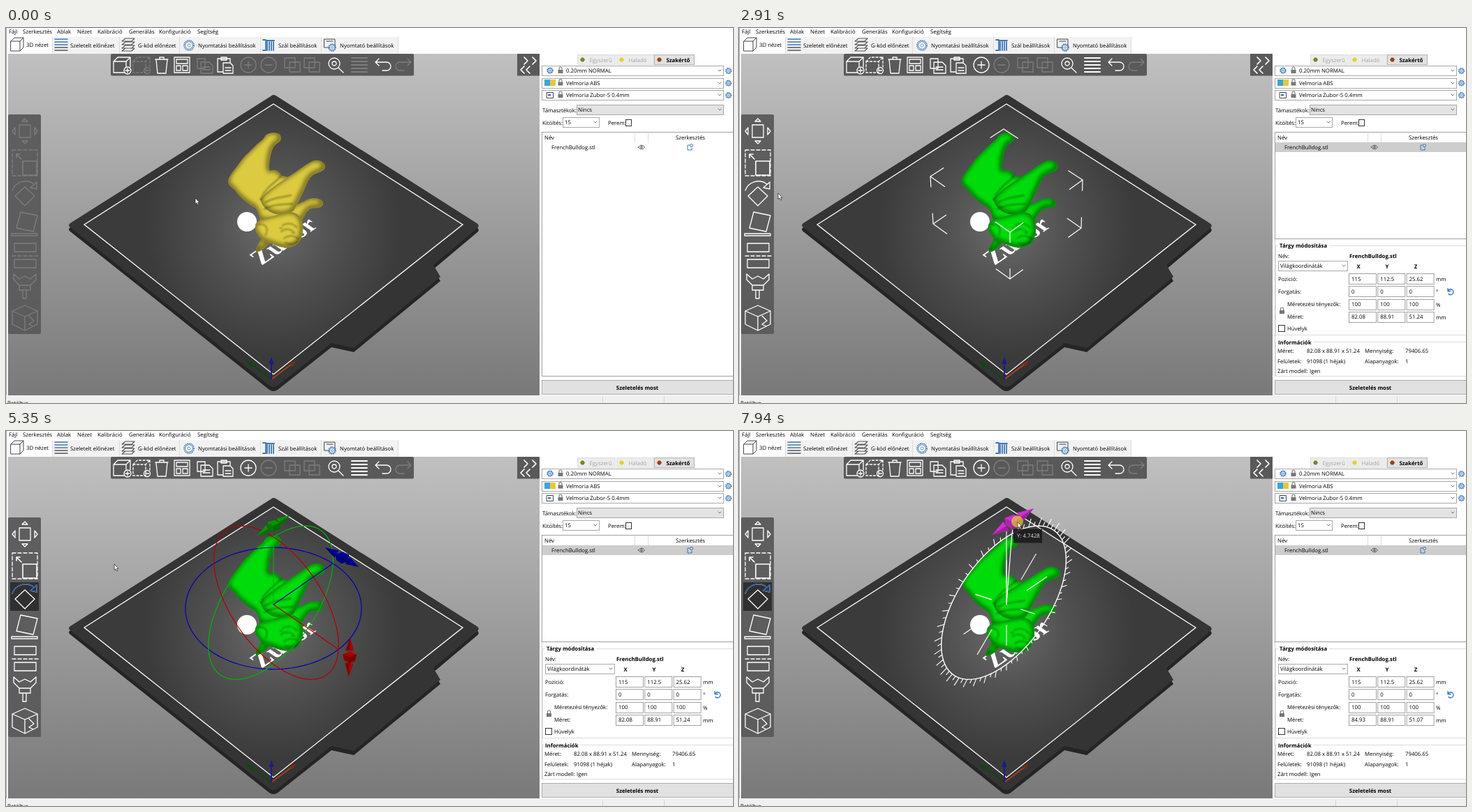
Write an HTML page that moves like this. It is 1041 px wide and 538 px high and loops after 8 s.

```html
<!DOCTYPE html>
<html lang="hu">
<head>
<meta charset="utf-8">
<style>
html, body { margin: 0; height: 100%; overflow: hidden; background: #fff; }
svg { display: block; width: 100vw; height: 100vh; font: 7.8px "Open Sans", sans-serif; text-rendering: geometricPrecision; }
.b { font-weight: 700; }
.line { fill: none; stroke-linejoin: round; stroke-linecap: round; }
.on { stroke: #fff; }
.off, .sel { stroke: #7d7d7d; }
.picked .sel { stroke: #fff; }
</style>
</head>
<body>
<svg id="stage" viewBox="0 0 1041 538" preserveAspectRatio="none"></svg>
<script>
const stage = document.getElementById('stage');
const $ = id => document.getElementById(id);

// Drawing helpers
const text = (x, y, s, attr = '') => `<text x="${x}" y="${y}" ${attr}>${s}</text>`;
const bold = (x, y, s, attr = '') => text(x, y, s, `class="b" ${attr}`);
const rect = (x, y, w, h, fill, stroke = 'none', attr = '') =>
  `<rect x="${x}" y="${y}" width="${w}" height="${h}" fill="${fill}" stroke="${stroke}" ${attr}/>`;
const line = (d, stroke, w = 1, attr = '') =>
  `<path class="line" d="${d}" stroke="${stroke}" stroke-width="${w}" ${attr}/>`;
const icon = (x, y, d, cls = 'on', w = 1.3) =>
  `<path class="line ${cls}" transform="translate(${x} ${y})" d="${d}" stroke-width="${w}"/>`;
const group = (id, body, attr = '') => `<g id="${id}" ${attr}>${body}</g>`;
const disc = (r, x = 0, y = 0) => `M${x - r} ${y}a${r} ${r} 0 1 0 ${2 * r} 0a${r} ${r} 0 1 0 ${-2 * r} 0`;
const box = (x, y, w, h) => `M${x} ${y}h${w}v${h}h${-w}z`;

const gear = (x, y, r = 4) =>
  `<circle cx="${x}" cy="${y}" r="${r}" fill="none" stroke="#3f78b5" stroke-width="1.6" stroke-dasharray="1.6 .9"/>` +
  `<circle cx="${x}" cy="${y}" r="${r * .75}" fill="#fff" stroke="#3f78b5" stroke-width=".9"/>` +
  `<circle cx="${x}" cy="${y}" r="${r * .3}" fill="none" stroke="#3f78b5" stroke-width=".8"/>`;
const lock = (x, y) => rect(x - 3.5, y - 1, 7, 5, '#777') + line(`M${x - 2} ${y - 1}v-2a2 2 0 0 1 4 0v2`, '#777', 1.1);
const chevron = (x, y) => line(`M${x - 2} ${y - 1}l2 2l2 -2`, '#555', .8);
const combo = (x, y, w, h, s, tx, fill = '#fff') =>
  rect(x + .5, y + .5, w, h, fill, '#a8a8a8') + text(tx, y + h / 2 + 3.3, s) + chevron(x + w - 5, y + h / 2);

function windowChrome() {
  const menu = [[4, 'Fájl'], [24, 'Szerkesztés'], [73, 'Ablak'], [102, 'Nézet'], [131, 'Kalibráció'],
    [176, 'Generálás'], [219, 'Konfiguráció'], [274, 'Segítség']];
  const tabs = [[29, '3D nézet'], [92, 'Szeletelt előnézet'], [189, 'G-kód előnézet'],
    [275, 'Nyomtatási beállítások'], [390, 'Szál beállítások'], [478, 'Nyomtató beállítások']];
  const layers = [16, 20, 24, 28, 32].map((y, i) => line(`M70 ${y}h18`, i < 3 ? '#3f78b5' : '#555', 1.6)).join('');
  return rect(66, 13, 495, 24, '#f2f2f2') + rect(0, 0, 1, 538, '#9aa3ae') +
    menu.map(([x, s]) => text(x, 8.3, s)).join('') +
    tabs.map(([x, s], i) => text(x, i ? 28 : 27, s)).join('') +
    line('M66.5 13V37M162.5 13V37M248.5 13V37M364.5 13V37M451.5 13V37M561.5 13V37', '#dcdcdc') +
    line('M7 19h13v14h-13zM7 19l5 -5h13l-5 5M25 14v14l-5 5', '#444') + layers +
    line('M166 19l5 -4h13l-4 4zM166 24l5 -4h13l-4 4zM166 29l5 -4h13l-4 4zM166 33l5 -4h13l-4 4z', '#555', 1.1) +
    gear(262, 25, 7) + line('M368 17h4v15h-4M374 20v12M377 20v12M380 20v12M383 20v12M372 18h12', '#3f78b5', 1.8) +
    line('M456 16h15v12h-15zM459 19h9', '#444') + gear(467, 28, 5) +
    rect(0, 527, 1041, 11, '#f0f0f0') + line('M854.5 529V538M942.5 529V538', '#d5d5d5') + text(2, 541, 'Betöltve');
}

function toolbars() {
  const cube = 'M-12 -5H6V11H-12ZM-12 -5l6 -6H12l-6 6M12 -11V3';
  const twin = 'M-11 -9H0V5H-11ZM-6 -4H6L11 1V12H-6ZM-3 3H7M-3 7H7';
  const split = 'M-11 -10H4V4H-11ZM-4 -4H11V10H-4Z';
  const clip = 'M-11 -9H7V-3M-11 -9V10H-4M-6 -11H2V-7H-6ZM-3 -3H7L11 1V12H-3ZM0 4H8M0 8H8';
  const bin = 'M-9 -8H9M-3 -8v-3H3v3M-8 -8L-6 12H6L8 -8';
  const grid = box(-11, -11, 22, 22) + box(-8, -8, 16, 6) + box(-8, 1, 6, 7) + box(1, 1, 7, 7);
  const undo = 'M-11 -4H5a6 6 0 0 1 0 12H-1M-6 -9L-11 -4L-6 1';
  const redo = 'M11 -4H-5a6 6 0 0 0 0 12H1M6 -9L11 -4L6 1';
  const top = [[166, cube], [223, bin], [252, grid], [285, twin, 'sel'], [314, clip],
    [347, disc(11) + 'M-5 0H5M0 -5V5', 'sel'], [376, disc(11) + 'M-5 0H5', 'off'],
    [410, split, 'off'], [438, split, 'off'], [472, disc(8, -2, -2) + disc(3, -2, -2) + 'M4 4L11 11'],
    [506, 'M-11 -10H11M-11 -5H11M-11 0H11M-11 5H11M-11 10H11', 'sel', 2], [540, undo], [569, redo, 'off']];
  const left = [
    [148, box(-8, -9, 16, 18) + 'M-4 -14L0 -18L4 -14ZM-4 14L0 18L4 14ZM-14 -5L-18 0L-14 5ZM14 -5L18 0L14 5Z'],
    [281, 'M-6 -17L18 -12L12 11L-12 6Z' + box(-19, 14, 37, 3)],
    [327, box(-15, -18, 31, 12) + box(-15, 5, 31, 12) + 'M-18 0h5m3 0h5m3 0h5m3 0h5m3 0h5'],
    [371, 'M-16 -18V-10L-8 -2H8L16 -10V-18M-8 -2V5H8V-2M-3 5V17H2V5M-16 -18L-8 -11L0 -15L8 -11L16 -18'],
    [416, 'M-18 -10L0 -18L18 -10V9L0 18L-18 9ZM-18 -10L0 -2L18 -10M0 -2V18M6 -3L13 4L6 9L12 12']];
  return `<g opacity=".96">${rect(150, 37, 434, 31.5, '#565656', 'none', 'rx="2"') +
      rect(732, 37, 32, 31.5, '#565656') + rect(3, 124, 47, 315, '#5b5b5b', 'none', 'rx="2"')}</g>` +
    top.map(([x, d, cls, w]) => icon(x, 53, d, cls, w)).join('') +
    `<g stroke-dasharray="3 2.5">${icon(194, 53, cube, 'sel')}</g>` +
    '<circle cx="174" cy="61" r="5" fill="#565656"/>' + icon(174, 61, disc(5) + 'M-3 0H3M0 -3V3') +
    icon(202, 61, disc(4.5) + 'M-2.5 0H2.5', 'sel') +
    icon(748, 53, 'M-6 -11L-1 -6L-6 -1M6 -11L11 -6L6 -1M-6 2L-11 7L-6 12M2 2L-3 7L2 12', 'on', 1.7) +
    left.map(([y, d]) => icon(27, y, d, 'sel')).join('') +
    `<g stroke-dasharray="5 3">${icon(27, 194, box(-18, -19, 36, 37), 'sel')}</g>` +
    icon(27, 194, box(-3, -3, 20, 20) + 'M-5 -6L-12 -13M-12 -8V-13H-7', 'sel', 1.6) +
    group('rotBack', rect(6, 217, 41, 41, '#303030')) +
    icon(27, 240, 'M0 -12L14 1L0 15L-14 1Z', 'sel') +
    icon(27, 238, 'M-18 -5A20 20 0 0 1 13 -14M17 -17V-7L8 -9Z', 'sel') +
    group('rotArc', line('M9 233A20 20 0 0 1 40 224M44 221V231L35 229Z', '#2455a4', 1.5));
}

function bed() {
  const outline = 'M379 98Q383 94 388 98L674 280Q679 283 675 287L612 340L622 357L498 459L466 452L389 513Q383 517 377 513L92 286Q88 283 92 280Z';
  return rect(3, 37, 761, 490, 'url(#sky)') +
    `<path d="${outline}" fill="#252525" transform="translate(0 6)"/><path d="${outline}" fill="#343434"/>` +
    '<path d="M383 109L654 282L383 497L112 282Z" fill="url(#glow)" stroke="#fff" stroke-width="1.3"/>' +
    '<circle cx="345" cy="278" r="14" fill="#fff"/>' +
    '<text transform="matrix(.707 -.488 .707 .488 366 341)" font-family="Liberation Serif, serif" font-weight="700" font-size="43" fill="#fff">Zubor</text>' +
    line('M380 504L352 483', '#0a4a0a', 1.6) + '<path d="M344 478L354 481L350 487Z" fill="#0a4a0a"/>' +
    line('M380 504L408 483', '#a8431a', 1.6) + '<path d="M416 477L406 481L410 486Z" fill="#7a2c10"/>' +
    line('M380 504V481', '#1a1a90', 1.8) + '<path d="M380 472L376.500 482H383.500Z" fill="#1a1a90"/>';
}

// Each body part is a flat shape with a soft dark rim clipped to its inside
function dog() {
  const parts = [
    'M404 262C412 253 424 251 432 246C440 243 451 244 454 250C455 257 447 259 441 258C432 259 428 268 424 276L404 276Z',
    'M318 220C319 211 329 202 337 190C343 182 351 176 359 167C366 162 369 159 371 155C374 150 386 149 391 152C396 156 394 163 389 165C382 169 380 177 378 187C377 195 376 200 378 205C384 202 391 205 394 211C402 216 414 214 420 210L427 232C422 242 417 249 414 256C408 266 402 272 395 278L364 276C362 268 361 262 357 258C345 252 332 240 328 233C325 230 318 226 318 220Z',
    'M364 246C374 232 392 222 408 211C418 205 430 195 439 191C448 187 457 193 457 199C456 206 447 207 441 210C433 215 431 224 427 232C422 242 418 252 412 262C398 274 370 268 364 246Z',
    'M366 301C362 310 356 316 358 322C366 321 372 314 378 307Z',
    'M360 278C370 272 390 268 402 265C414 262 424 270 425 282C426 294 424 306 414 312C404 317 392 315 384 311C374 307 366 306 362 298C356 292 355 282 360 278Z'];
  return parts.map((d, i) => `<clipPath id="part${i}"><path d="${d}"/></clipPath><path d="${d}" fill="currentColor"/>
    <g clip-path="url(#part${i})"><path d="${d}" transform="translate(-1 -1.500)" fill="none" stroke="#000" stroke-width="6" opacity=".55" filter="url(#soft)"/></g>`).join('') +
    '<g filter="url(#softer)" opacity=".3">' +
    line('M394 212C386 222 374 226 364 246M372 250C382 243 396 243 408 240M370 260C382 252 398 254 410 252', '#000', 2.5) +
    line('M361 282C370 280 377 285 372 297M396 283C402 279 412 280 416 286M394 292C400 287 408 288 412 293M398 302C405 296 415 298 419 303M400 308C408 311 414 310 418 306M410 294h3M392 287h3', '#000', 2.2) +
    '</g>';
}

function selectionBox() {
  const corners = [[379, 145], [274, 213], [388, 293], [492, 218], [380, 211], [278, 281], [388, 360], [490, 287]];
  const hidden = 4;
  let d = '';
  corners.forEach(([x, y], i) => {
    if (i === hidden) return;
    const level = i & 4;
    for (const j of [level + (i + 1) % 4, level + (i + 3) % 4, i ^ 4]) {
      if (i === 0 && j === hidden) continue;
      const [u, v] = corners[j], f = j === (i ^ 4) ? .22 : .18;
      d += `M${x} ${y}L${x + (u - x) * f} ${y + (v - y) * f}`;
    }
  });
  return line(d, '#fff', 1.2);
}

// Gizmo space: the rings have radius 1 around HUB, seen with a slight perspective
const HUB = [383, 249], REACH = 1.16;
function project(x, y, z) {
  const scale = 1 / (1 + .087 * (.51 * (x + y) - .69 * z));
  return [HUB[0] + 89 * (x - y) * scale, HUB[1] - (61.5 * (x + y) + 91 * z) * scale];
}
const onRing = (a, r = 1) => project(Math.cos(a) * r, 0, Math.sin(a) * r);
const ring = (point, color, w = 1.2) =>
  line('M' + Array.from({ length: 90 }, (_, i) => point(Math.cos(i * Math.PI / 45), Math.sin(i * Math.PI / 45))).join('L') + 'Z', color, w);
const spoke = (x, y, z, color) => line(`M${HUB}L${project(x, y, z)}`, color, 1.2);

const grabber = ([x, y], turn, color, id = '') =>
  `<g ${id && `id="${id}"`} transform="translate(${x} ${y})" fill="${color}">
    <g transform="rotate(${turn})"><path d="M28 0L9 -6V6ZM-28 0L-9 -6V6Z"/><path d="M28 0L9 0V6ZM-28 0L-9 0V6Z" fill="#000" opacity=".25"/></g>
    <path d="M-9.500 -4L1 -8L10 -4L8 6L-1 9L-8 4Z"/><path d="M-9.500 -4L0 0L-1 9L-8 4Z" fill="#000" opacity=".18"/>
    <path d="M10 -4L0 0L-1 9L8 6Z" fill="#000" opacity=".3"/></g>`;

function gizmo() {
  return ring((c, s) => project(c, s, 0), '#0000b4') + ring((c, s) => project(c, 0, s), '#00b400') +
    ring((c, s) => project(0, c, s), '#b40000') +
    spoke(0, 0, 1, '#00b400') + spoke(1, 0, 0, '#0000b4') + spoke(0, -1, 0, '#b40000') +
    grabber(project(0, 0, REACH), -32.5, '#009600') + grabber(project(REACH, 0, 0), 30, '#0000a0') +
    grabber(project(0, -REACH, 0), 92, '#a80000');
}

function activeRing() {
  let d = '';
  const stroke = (a, r0, r1) => { d += `M${onRing(a, r0)}L${onRing(a, r1)}`; };
  for (let i = 0; i < 72; i++) stroke(i * Math.PI / 36, 1, i % 2 ? 1.05 : 1.1);
  for (let i = 0; i < 8; i++) stroke(i * Math.PI / 4, 1 / 3, 2 / 3);
  return ring((c, s) => project(c, 0, s), '#fff', 1.4) + line(d, '#fff', 1.1) + spoke(0, 0, 1, '#fff') +
    '<path id="angle" class="line" stroke="#fff" stroke-width="1.2"/>' +
    grabber(project(0, 0, REACH), -32.5, '#d22ed2', 'handle');
}

function objectPanel() {
  const rows = [['Pozició:', 772, ['115', '112.5', '25.62'], 'mm'], ['Forgatás:', 772, ['0', '0', '0'], '°'],
    ['Méretezési tényezők:', 785, ['100', '100', '100'], '%'], ['Méret:', 785, ['82.08', '88.91', '51.24'], 'mm']];
  const fields = rows.map(([label, x, values, unit], r) => {
    const y = 352 + r * 18.3;
    return text(x, y + 10.5, label) + text(998, y + 11, unit) + values.map((v, i) => {
      const fx = 873 + i * 41.3;
      return rect(fx + .5, Math.round(y) + .5, 39, 15, '#fff', '#8a8a8a', 'stroke-width=".8"') +
        text(fx + 4, y + 10.5, v, r === 3 ? `id="size${i}"` : '');
    }).join('');
  }).join('');
  return rect(767.5, 302, 275, 200, '#fff') + line('M767 302.5H1041', '#a0a0a0') +
    rect(768.5, 312.5, 274, 128, 'none', '#dcdcdc') + rect(768.5, 450.5, 274, 49, 'none', '#dcdcdc') +
    rect(772, 306, 73, 12, '#fff') + rect(770, 445, 52, 12, '#fff') +
    bold(774, 314.5, 'Tárgy módosítása') + text(772, 329.5, 'Név:') + bold(874, 329.5, 'FrenchBulldog.stl') +
    combo(772, 334, 99, 14, 'Világkoordináták', 775) +
    ['X', 'Y', 'Z'].map((s, i) => bold(887 + i * 41, 345, s, 'text-anchor="middle"')).join('') + fields +
    line('M1016 376a4 4 0 1 1 0 5.500M1015 373.500v4h4', '#2a6fc9', 1.3) + lock(777.5, 406) +
    rect(772.5, 426.5, 9, 9, '#fff', '#333') + text(785, 434, 'Hüvelyk') + bold(772, 453.500, 'Információk') +
    text(771, 466, 'Méret:') + text(813, 466, '82.08 x 88.91 x 51.24') + text(896, 466, 'Mennyiség:') + text(954, 466, '79406.65') +
    text(771, 480.5, 'Felületek:') + text(813, 480.5, '91098 (1 héjak)') + text(896, 480.5, 'Alapanyagok:') + text(954, 480.5, '1') +
    text(771, 494.5, 'Zárt modell:') + text(817, 494.5, 'Igen');
}

function sidePanel() {
  const modes = [[818, 55, 'Egyszerű', '#80802a'], [874, 54, 'Haladó', '#e6cf2c'], [928, 58, 'Szakértő', '#a04008']];
  const presets = [[54, '0.20mm NORMAL'], [71.5, 'Velmoria ABS'], [89, 'Velmoria Zubor-5 0.4mm']];
  return rect(764, 37, 277, 490, '#fff') +
    modes.map(([x, w, s, c], i) => rect(x + .5, 38.5, w - 1, 14, i < 2 ? '#ececec' : '#e1e1e1', i < 2 ? '#dedede' : '#b5b5b5') +
      `<path d="M${x + 4} 45.500l2 -3h3l2 3l-2 3h-3z" fill="${c}"/>` +
      text(x + 17.5, 48.5, s, i < 2 ? 'fill="#a3a3a3"' : 'class="b"')).join('') +
    presets.map(([y, s]) => combo(767, Math.round(y), 260, 14, s, 802) + lock(794, y + 7) + gear(1034.5, y + 7.500, 3.8)).join('') +
    gear(779, 61, 4) + rect(771, 74, 8, 9, '#3aa5dc') + rect(779, 74, 8, 9, '#e2c93a') +
    line('M774.500 92.500h9v8h-9z', '#444') + rect(776, 95, 4, 2.5, '#3f78b5') +
    text(768, 121, 'Támasztékok:') + combo(817, 110, 210, 14, 'Nincs', 819, '#e3e3e3') +
    text(768, 139, 'Kitöltés:') + combo(797, 128, 52, 14, '15', 800) +
    text(862, 139, 'Perem:') + rect(887.5, 131.5, 8, 9, '#fff', '#333') +
    rect(767.5, 149.5, 275, 350, '#fff', '#a0a0a0') + group('rowBack', rect(768, 164, 273, 14, '#cdcdcd')) +
    line('M900.500 150V164M919.500 150V164', '#dedede') +
    text(771, 160, 'Név') + text(959, 160, 'Szerkesztés') + text(781, 174, 'FrenchBulldog.stl') +
    line('M905.500 171Q910 165 914.500 171Q910 177 905.500 171Z' + disc(1.3, 910, 171), '#555', 1) +
    line('M979 168h-3v7h6v-3', '#3f78b5', 1) + '<circle cx="981.500" cy="168.500" r="2" fill="none" stroke="#3f78b5"/>' +
    group('object', objectPanel()) +
    rect(767.5, 505.5, 275, 20, '#e1e1e1', '#adadad') + bold(904, 518.5, 'Szeletelés most', 'text-anchor="middle"');
}

const tip = (id, w, s) => group(id, rect(0, 0, w, 20, '#1b1b1b', 'none', 'opacity=".88"') +
  text(5, 12.5, s, `id="${id}Text" fill="#e4e4e4"`));
const blur = (id, size) => `<filter id="${id}" filterUnits="userSpaceOnUse" x="300" y="130" width="180" height="210">
  <feGaussianBlur stdDeviation="${size}"/></filter>`;

stage.innerHTML = `<defs>
  <linearGradient id="sky" x2="0" y2="1"><stop stop-color="#c0c0c0"/><stop offset="1" stop-color="#797979"/></linearGradient>
  <radialGradient id="glow" gradientUnits="userSpaceOnUse" cx="383" cy="285" r="185">
    <stop stop-color="#6c6c6c"/><stop offset=".45" stop-color="#525252"/><stop offset="1" stop-color="#3b3b3b"/></radialGradient>
  ${blur('soft', 3)}${blur('softer', 1)}</defs>` +
  rect(0, 0, 1041, 538, '#fff') + windowChrome() + bed() + group('dog', dog()) +
  group('bounds', selectionBox()) + group('gizmo', gizmo()) + group('active', activeRing()) +
  toolbars() + sidePanel() + tip('hint', 53, 'Forgatás [R]') + tip('readout', 41, '') +
  group('pointer', '<circle id="click" cx="-.500" cy="-.500" r="8.500" fill="#ebdc1e" opacity=".65"/>' +
    '<path d="M0 0V8.500L2 6.800L3.500 10L5 9.300L3.600 6.300H6Z" fill="#fff" stroke="#222" stroke-width=".7"/>');

const route = [[0, 271, 244], [410, 271, 244], [870, 363, 225], [1540, 363, 225], [1850, 240, 252], [2100, 120, 249],
  [2340, 78, 239], [2390, 78, 239], [2510, 78, 233], [2710, 78, 233], [2910, 56, 237], [3170, 56, 237], [3440, 28, 238],
  [4990, 28, 238], [5350, 155, 191], [5540, 155, 191], [5750, 293, 157], [5880, 293, 157], [6210, 372, 143],
  [6310, 372, 143], [6620, 378, 141], [7550, 378, 141], [7940, 399, 130.5], [8001, 399, 130.5]];

function pointerAt(t) {
  const i = route.findIndex(k => k[0] > t);
  const [t0, x0, y0] = route[i - 1], [t1, x1, y1] = route[i];
  const f = (t - t0) / (t1 - t0);
  return [x0 + (x1 - x0) * f, y0 + (y1 - y0) * f];
}
const show = (id, on) => { $(id).style.display = on ? '' : 'none'; };
const move = (id, x, y) => $(id).setAttribute('transform', `translate(${x} ${y})`);

function draw(t) {
  const [x, y] = pointerAt(t);
  const picked = t >= 1310, rotating = t >= 4460, hot = t >= 6140, held = t >= 7410;
  const turn = Math.max(0, Math.min(1, (t - 7550) / 390)), degrees = 4.7428 * turn;

  stage.classList.toggle('picked', picked);
  $('dog').style.color = picked ? '#00dc0a' : t >= 690 ? '#66d81c' : '#dccb40';
  $('dog').setAttribute('transform', `matrix(1 ${.04 * turn} ${-.06 * turn} 1 ${15 * turn} ${-13 * turn})`);
  show('rowBack', picked);
  show('object', picked);
  show('bounds', picked && !rotating);
  show('rotBack', rotating);
  show('rotArc', t >= 3370);
  show('gizmo', rotating && !hot);
  show('active', hot);
  show('hint', t >= 3800 && t < 5050);
  show('readout', hot);
  show('click', t >= 1250 && t < 1370 || t >= 4460 && t < 4590 || held);

  const a = Math.PI / 2 - degrees * Math.PI / 180;
  const [hx, hy] = onRing(a, REACH);
  $('handle').setAttribute('transform', `translate(${hx} ${hy}) scale(${held ? 1.27 : 1})`);
  $('angle').setAttribute('d', `M${HUB}L${onRing(a)}`);
  $('size0').textContent = (82.08 + 2.85 * turn).toFixed(2);
  $('size2').textContent = (51.24 - .17 * turn).toFixed(2);
  $('readoutText').textContent = 'Y: ' + degrees.toFixed(4);
  move('hint', 27, 247);
  move('readout', x - 6 * turn, y + 10);
  move('pointer', x, y);
}

(function frame() {
  draw(performance.now() % 8000);
  requestAnimationFrame(frame);
})();
</script>
</body>
</html>
```
